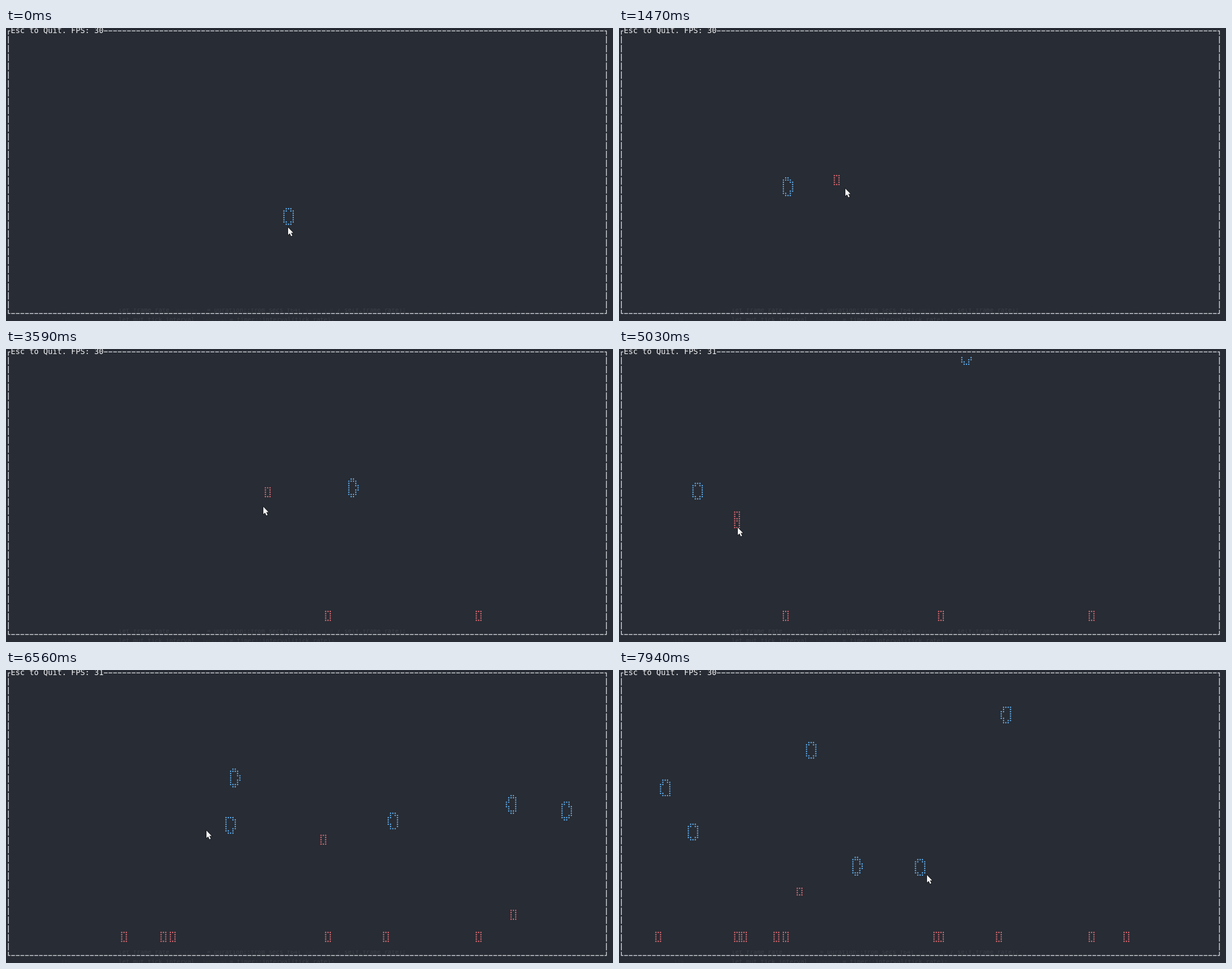
Animation of 1078 by 520 pixels, one loop 8 s. Source, as an HTML page with a canvas:

```html
<!DOCTYPE html>
<html lang="en">
<head>
<meta charset="utf-8">
<style>
  html, body { margin: 0; width: 100%; height: 100%; overflow: hidden; background: #282c34; }
  canvas { display: block; }
</style>
</head>
<body>
<canvas id="stage" width="1078" height="520"></canvas>
<script>
const ctx = document.getElementById('stage').getContext('2d');
const LOOP = 8000, LAG = 35, STEP = 70;
const CELL_W = 8.233, CELL_H = 15.67;
const DOT_X = 4.116, DOT_Y = 3.918, ORIGIN_X = 3.8, ORIGIN_Y = 15.2;
const BLUE = '#61afef', RED = '#e06c75', LIGHT = '#d4d7dc', BG = '#282c34';
const FLOOR_Y = 473, RISE = 140, FALL = 1100;

// Sampling restarts at these times, then advances in even steps
const anchors = [0, 1470, 2620, 3590, 5030, 6560, 7940];

// Shapes in order of release: kind, x, y, time
const shapes = [
  ['ball', 299.8, 296.8, 1010], ['box', 572, 270, 2010], ['box', 840, 270, 2680],
  ['ball', 615.5, 259.6, 3150], ['box', 296, 262, 3740], ['ball', 139.6, 265, 4600],
  ['box', 209, 297, 4880], ['box', 280, 297, 5130], ['ball', 405.5, 298, 5330],
  ['box', 675, 295, 5520], ['ball', 898.6, 292.2, 5680], ['ball', 995.3, 293.7, 5770],
  ['box', 901, 291, 6050], ['ball', 688.3, 273.9, 6270], ['box', 563, 288.6, 6410],
  ['ball', 340.9, 263, 6630], ['box', 222, 270, 6740], ['ball', 83, 277, 6960],
  ['box', 69, 290, 7150], ['ball', 131.4, 313, 7350], ['box', 321, 330, 7600],
  ['ball', 421.7, 350.5, 7750], ['ball', 534.8, 350, 8100]
].map(([kind, x, y, drop], i, all) => {
  const prev = i ? all[i - 1][3] : -1000;
  return { kind, x, y, drop, grab: prev + 0.4 * (drop - prev) };
});

// Pointer path: waypoints plus every release point
const path = [
  [-35, 503, 348], [0, 501, 354], [250, 578, 374], [1435, 388, 284], [1470, 402, 285],
  [1670, 574, 284], [2480, 816, 284], [2585, 841, 284], [2620, 841, 283],
  [3555, 466, 268], [3590, 457, 280], [4995, 210, 311], [5030, 211, 317],
  [5850, 1009, 306], [6525, 399, 289], [6560, 356, 285], [7180, 59, 306],
  [7905, 536, 364], [7940, 547, 364], [8000, 548, 364]
].concat(shapes.map(s => [s.drop - LAG, s.x + 1, s.y + 14])).sort((a, b) => a[0] - b[0]);

function pointer(t) {
  let i = 1;
  while (i < path.length - 1 && path[i][0] < t) i++;
  const [t0, x0, y0] = path[i - 1], [t1, x1, y1] = path[i];
  const k = (t - t0) / (t1 - t0);
  return [x0 + (x1 - x0) * k, y0 + (y1 - y0) * k];
}

function place(s, t) {
  if (t < s.drop) {
    const [x, y] = pointer(t - LAG);
    return [x - 1, y - 14];
  }
  const sec = (t - s.drop) / 1000;
  return [s.x, s.kind === 'ball' ? s.y - RISE * sec * sec / 2
                                 : Math.min(FLOOR_Y, s.y + FALL * sec * sec / 2)];
}

function plot(dots, gx, gy) {
  const c = Math.floor(gx), r = Math.floor(gy);
  if (r >= 0) dots.add(r * 1000 + c);
}

function raster(dots, kind, x, y) {
  const gx = (x - ORIGIN_X) / DOT_X + 0.5, gy = (y - ORIGIN_Y) / DOT_Y + 0.5;
  if (kind === 'ball') {
    for (let a = 0; a < 360; a++) {
      const r = a * Math.PI / 180;
      plot(dots, gx + 2.02 * Math.cos(r), gy + 3.7 * Math.sin(r));
    }
    return;
  }
  const top = Math.floor(gy - 1.9), bottom = Math.floor(gy + 1.9);
  for (let r = top; r <= bottom; r++) {
    plot(dots, gx - 1, r);
    plot(dots, gx + 1, r);
    if (r === top || r === bottom) plot(dots, gx, r);
  }
}

function paintDots(dots, color) {
  ctx.fillStyle = color;
  ctx.beginPath();
  for (const d of dots) {
    const x = ORIGIN_X + (d % 1000) * DOT_X, y = ORIGIN_Y + Math.floor(d / 1000) * DOT_Y;
    ctx.moveTo(x + 1.2, y);
    ctx.arc(x, y, 1.2, 0, 7);
  }
  ctx.fill();
}

function text(str, x, y, size, color) {
  ctx.font = `${size}px "DejaVu Sans Mono", monospace`;
  ctx.fillStyle = color;
  ctx.fillText(str, x, y);
}

function ghostText() {
  ctx.save();
  ctx.beginPath();
  ctx.rect(0, 498, 1078, 22);
  ctx.clip();
  const ink = '#3b4048', dim = '#30353d', size = 10.7;
  text('let frame_rate', 200, 504, size, ink);
  text(': Duration', 292, 504, 8, dim);
  text('= Duration::from_secs_f64(', 357, 504, size, ink);
  text('secs: 1.0', 532, 504, 9, dim);
  text('/ self.frame_rate);', 588, 504, size, ink);
  text('let mut tick_interval', 200, 521, size, ink);
  text(': Interval', 338, 521, 9, dim);
  text('= timer::interval(tick_rate);', 397, 521, size, ink);
  text('119', 98, 521, 9, dim);
  ctx.restore();
}

function frame() {
  ctx.fillStyle = LIGHT;
  const left = 4.3, top = 5.2, right = left + 129 * CELL_W, bottom = top + 32 * CELL_H;
  for (let c = 1; c < 129; c++) {
    const x = left + (c - 0.5) * CELL_W + 0.8;
    if (c > 20) ctx.fillRect(x, top - 0.7, CELL_W - 1.6, 1.4);
    ctx.fillRect(x, bottom - 0.7, CELL_W - 1.6, 1.4);
  }
  for (let r = 1; r < 32; r++) {
    const y = top + (r - 0.5) * CELL_H + 1.2;
    ctx.fillRect(left - 0.7, y, 1.4, CELL_H - 2.4);
    ctx.fillRect(right - 0.7, y, 1.4, CELL_H - 2.4);
  }
  for (const x of [left, right]) for (const y of [top, bottom]) {
    ctx.fillRect(x - 0.7, y === top ? y : y - 6.6, 1.4, 6.6);
    ctx.fillRect(x === left ? x - 0.7 : x - 3.3, y - 0.7, 4, 1.4);
  }
}

function arrow([x, y]) {
  ctx.beginPath();
  [[0, 0], [0, 13], [3, 10.4], [5.4, 15.6], [7.6, 14.6], [5.2, 9.6], [9.2, 9.4]]
    .forEach(([dx, dy]) => ctx.lineTo(x + dx, y + dy));
  ctx.closePath();
  ctx.lineWidth = 1.6;
  ctx.strokeStyle = '#14171b';
  ctx.stroke();
  ctx.fillStyle = '#f4f4f4';
  ctx.fill();
}

function draw(t) {
  ctx.fillStyle = BG;
  ctx.fillRect(0, 0, 1078, 520);
  ghostText();
  frame();
  const fps = [30, 31, 30, 31, 30, 31, 31, 31, 30][Math.max(0, Math.floor((t - 330) / 1040) + 1)];
  text(`Esc to Quit. FPS: ${fps}`, 8.6, 9, 13.68, '#f0f1f3');

  const balls = new Set(), boxes = new Set();
  for (const s of shapes) {
    if (t >= s.grab) raster(s.kind === 'ball' ? balls : boxes, s.kind, ...place(s, t));
  }
  paintDots(balls, BLUE);
  paintDots(boxes, RED);
  arrow(pointer(t));
}

function tick() {
  const t = performance.now() % LOOP;
  const base = anchors.filter(a => a <= t).pop();
  draw(base + Math.floor((t - base) / STEP) * STEP);
  requestAnimationFrame(tick);
}
tick();
</script>
</body>
</html>
```
